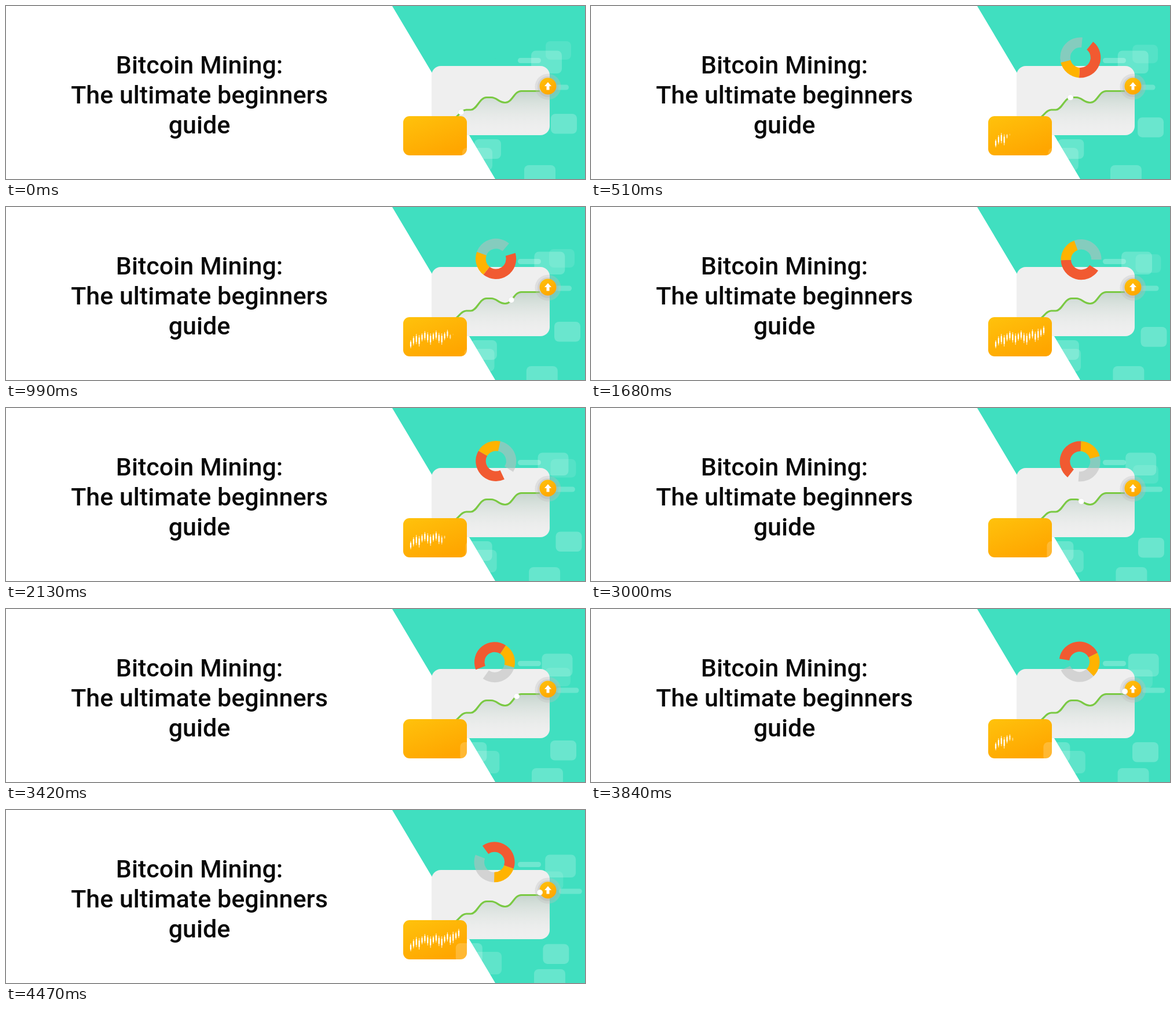
These frames come from a looping animation (1000x300 px, 4.5 s). An HTML page:

```html
<!DOCTYPE html>
<html lang="en">
<head>
<meta charset="utf-8">
<title>Bitcoin Mining guide banner</title>
<style>
  html, body { margin: 0; width: 100%; height: 100%; overflow: hidden; background: #fff; }
  svg { display: block; width: 100%; height: 100%; }
  text { font: 500 43px Roboto, sans-serif; text-anchor: middle; fill: #0a0a0a; }
</style>
</head>
<body>
<svg viewBox="0 0 1000 300">
  <defs>
    <linearGradient id="gold" x1="0" y1="0" x2=".6" y2="1">
      <stop offset="0" stop-color="#ffc20c"/><stop offset="1" stop-color="#ffa600"/>
    </linearGradient>
    <linearGradient id="fade" x1="0" y1="0" x2="0" y2="1">
      <stop offset="0" stop-color="#b4cabf" stop-opacity=".85"/>
      <stop offset="1" stop-color="#efefef" stop-opacity="0"/>
    </linearGradient>
  </defs>

  <path fill="#40dfc0" d="M667 0H1000V300H845Z"/>
  <text x="334" y="117">Bitcoin Mining:</text>
  <text x="334" y="169">The ultimate beginners</text>
  <text x="334" y="221">guide</text>

  <g id="back" fill="#fff"></g>

  <rect x="735" y="104" width="204" height="120" rx="16" fill="#efefef"/>
  <path id="area" fill="url(#fade)"/>
  <path id="line" fill="none" stroke="#7ac943" stroke-width="3.2"/>
  <path id="track" fill="none" d="M786 184C791 179 796 179 801 179C813 179 818 159 829 158.5C840 157 844 161 847 162C857 169 866 168 873 161C884 149 886 147 894 146L922 143"/>

  <circle cx="936" cy="140" r="22.5" fill="#bdbdbd" opacity=".32"/>
  <circle cx="936" cy="140" r="18" fill="#a8a8a8" opacity=".28"/>
  <circle cx="936" cy="139" r="14.5" fill="url(#gold)"/>
  <path d="M936 132L942 139H938.5V145.5H933.5V139H930Z" fill="#fff"/>
  <circle id="dot" r="5" fill="#fff" stroke="#bbb" stroke-opacity=".35" stroke-width=".7"/>

  <g id="donut" fill="none" stroke-width="17.5"></g>

  <rect x="686" y="191" width="110" height="68" rx="11" fill="url(#gold)"/>
  <g id="candles" stroke="#fff" stroke-linecap="round"></g>
  <g id="front" fill="#fff"></g>
</svg>
<script>
const LOOP = 4500;
const $ = id => document.getElementById(id);
const clamp = v => Math.max(0, Math.min(1, v));

function add(parent, tag, attrs) {
  const el = document.createElementNS('http://www.w3.org/2000/svg', tag);
  for (const k in attrs) el.setAttribute(k, attrs[k]);
  return $(parent).appendChild(el);
}

const curve = 'M777 193C784 187 788 180 795 180H803C813 180 818 158.5 830 158.5H838C848 158.5 851 167.5 862 167.5C875 167.5 877 147.5 890 147.5H922';
$('line').setAttribute('d', curve);
$('area').setAttribute('d', curve + 'C929 147 934 144 939 140V208Q939 224 923 224H777Z');

// Ring segments as [start, end, colour, opacity] in degrees
const CENTRE = [1.4, -0.75], RADIUS = 26.3;
const polar = deg => {
  const a = deg * Math.PI / 180;
  return `${CENTRE[0] + RADIUS * Math.cos(a)} ${CENTRE[1] + RADIUS * Math.sin(a)}`;
};
[[0, 145, '#f15a31', 1], [145, 217, '#ffb300', 1], [217, 327, '#bebebe', .55]]
  .forEach(([a, b, stroke, opacity]) => add('donut', 'path', {
    d: `M${polar(a)}A${RADIUS} ${RADIUS} 0 0 1 ${polar(b)}`, stroke, opacity
  }));

const candles = [238, 232, 229, 232, 226, 223, 226, 229, 225, 222, 227, 229, 224, 220, 225, 221, 218, 214]
  .map((y, i) => {
    const x = 699 + i * 4.88, h = 6.5 + (i * 5 % 4);
    return { x, y, h,
      wick: add('candles', 'path', { 'stroke-width': .9 }),
      body: add('candles', 'path', { 'stroke-width': 2.3 }) };
  });

// Tiles drifting sideways at vx px per second
const tile = (layer, x, y, width, height, opacity, vx, rx = 8) =>
  ({ x, vx, el: add(layer, 'rect', { x, y, width, height, rx, opacity }) });
const tiles = [
  tile('back', 907, 77.5, 53, 39.5, .2, 5.4),
  tile('back', 884, 90, 40, 9, .25, 0, 4.5),
  tile('back', 932, 136.5, 40, 9, .22, 5.1, 4.5),
  tile('back', 895, 276, 54, 40, .2, 3.8),
  tile('front', 809, 231, 46, 34, .2, -7.2),
  tile('front', 788, 246, 52, 39, .16, 3.6)
];
const swing = [
  tile('back', 941, 187, 45, 34.5, .22, 0),
  tile('back', 932, 61, 44, 32, .1, 0)
];
// Offsets of the swinging tiles: time, x, y
const arc = [[0, 0, 0], [990, 6, 12], [1680, 8.5, 21], [2130, 8.5, 27.5],
  [3000, 4, 38], [3840, -6, 44], [4500, -14, 45.5]];

function arcAt(t) {
  const i = Math.max(1, arc.findIndex(p => p[0] >= t));
  const a = arc[i - 1], b = arc[i], k = (t - a[0]) / (b[0] - a[0]);
  return [1, 2].map(n => a[n] + (b[n] - a[n]) * k);
}

// Distance the candle row has been revealed, in px
function reveal(t) {
  const d = t < 1800 ? t - 250 : t < 3200 ? 2760 - t : t - 3510;
  return Math.min(96, d / 10);
}

const track = $('track'), trackLength = track.getTotalLength();
const RUN = 1540, SECOND = 2296;

function draw(t) {
  for (const { el, x, vx } of tiles) el.setAttribute('x', x + vx * t / 1000);
  const [dx, dy] = arcAt(t);
  for (const { el } of swing) el.setAttribute('transform', `translate(${dx} ${dy})`);

  const grow = 1 - (1 - clamp(t / 400)) ** 3;
  $('donut').setAttribute('transform',
    `translate(845 91) rotate(${t * .072 - 88}) scale(${grow})`);

  const second = t >= SECOND;
  const p = track.getPointAtLength(trackLength * clamp((second ? t - SECOND : t) / RUN));
  $('dot').setAttribute('cx', p.x);
  $('dot').setAttribute('cy', p.y);
  $('dot').setAttribute('opacity', second ? 1 : clamp((1650 - t) / 110));

  const shown = reveal(t);
  for (const { x, y, h, wick, body } of candles) {
    const k = clamp((shown - (x - 699)) / 12);
    const bar = s => `M${x} ${y - h * s * k}V${y + h * s * k}`;
    wick.setAttribute('d', bar(1));
    body.setAttribute('d', bar(.5));
    wick.setAttribute('opacity', k);
    body.setAttribute('opacity', k);
  }
}

const start = performance.now();
function frame() {
  draw((performance.now() - start) % LOOP);
  requestAnimationFrame(frame);
}
draw(0);
requestAnimationFrame(frame);
</script>
</body>
</html>
```
